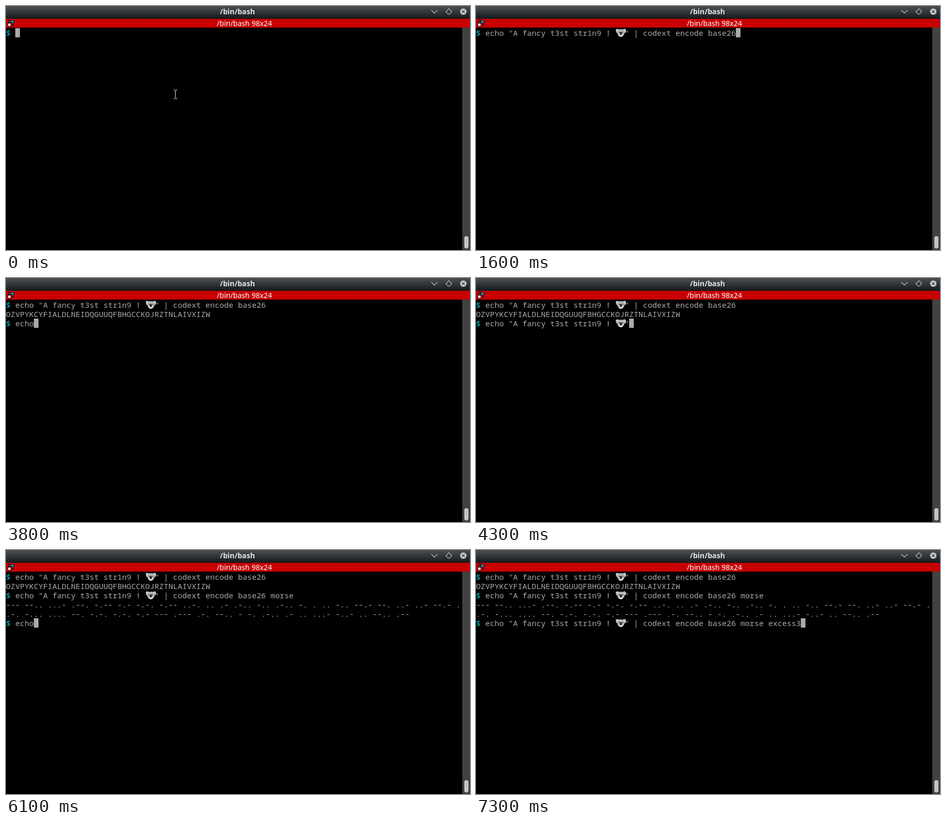
Write an HTML page that moves like this. It is 900 px wide and 475 px high and loops after 8 s.

```html
<!DOCTYPE html>
<html lang="en">
<head>
<meta charset="utf-8">
<title>Terminal session</title>
<style>
  html, body { margin: 0; width: 100%; height: 100%; overflow: hidden; background: #000; }
  svg { display: block; width: 900px; height: 475px; }
  text { white-space: pre; }
  .bar { font: 14.1px "Noto Sans", sans-serif; text-anchor: middle; }
  .title { font-weight: bold; fill: #e2e3e3; }
  #rows text { font: 15px "Noto Sans Mono", monospace; font-variant-ligatures: none; fill: #aaa; }
  #rows .prompt { font-weight: bold; fill: #06989a; }
</style>
</head>
<body>
<svg viewBox="0 0 900 475">
  <defs>
    <linearGradient id="chrome" x1="0" y1="0" x2="0" y2="1">
      <stop offset="0" stop-color="#4a5054"/>
      <stop offset=".5" stop-color="#303538"/>
      <stop offset="1" stop-color="#16181a"/>
    </linearGradient>
    <g id="koala">
      <path d="M1 3Q4 0 8 3L7 8Q4 11 2 8Z M21 3Q18 0 14 3L15 8Q18 11 20 8Z" fill="#d5d0d0"/>
      <path d="M3 4Q5 3 7 5L6 8Q4 8 3 4Z M19 4Q17 3 15 5L16 8Q18 8 19 4Z" fill="#b5a5a8"/>
      <path d="M6 4Q11 0 16 4Q19 9 17 13Q14 17 11 17Q8 17 5 13Q3 9 6 4Z" fill="#b9b9b9"/>
      <ellipse cx="11" cy="14.4" rx="3.6" ry="2" fill="#dedede"/>
      <ellipse cx="11" cy="10.2" rx="2" ry="3.2" fill="#252525"/>
      <circle cx="7.4" cy="8.3" r="1" fill="#252525"/>
      <circle cx="14.6" cy="8.3" r="1" fill="#252525"/>
    </g>
  </defs>

  <rect width="900" height="475"/>
  <rect width="900" height="25" fill="url(#chrome)"/>
  <text class="bar title" x="449" y="16">/bin/bash</text>
  <g fill="none" stroke="#c6c8c9" stroke-width="1.1">
    <path d="M825 8l6 6 6-6"/>
    <path d="M859 5.2l5.8 5.8-5.8 5.8-5.8-5.8z"/>
  </g>
  <circle cx="887" cy="11" r="6.2" fill="#c6c8c9"/>
  <path d="M884.3 8.3l5.4 5.4m0-5.4l-5.4 5.4" stroke="#25292b" stroke-width="1.2"/>

  <rect y="25" width="900" height="17" fill="#c80003"/>
  <text class="bar" x="462.5" y="39" fill="#fff">/bin/bash 98x24</text>
  <g stroke="#140606">
    <rect x="4.5" y="27.5" width="5" height="5" fill="#9c1015"/>
    <rect x="9.5" y="27.5" width="6" height="6" fill="#28809c"/>
    <rect x="3.5" y="33.5" width="6" height="6" fill="#e4e4e4"/>
  </g>
  <path d="M11 36h5l-2.5 3z" fill="#140606"/>

  <rect x="885" y="42" width="15" height="433" fill="#424041"/>
  <rect x="889" y="448" width="8" height="24" rx="4" fill="#c4c4c4"/>

  <g id="rows"></g>
  <rect id="cursor" width="9" height="18" fill="#aaa"/>
  <path id="pointer" d="M325 163.5h2.5l1 1 1-1h2.5M328.5 164v16M325 180.5h2.5l1-1 1 1h2.5" fill="none" stroke="#eee"/>
</svg>
<script>
const LOOP = 8000, CELL = 9, LINE = 18, TOP = 43;
// Two blank cells hold the emoji at columns 30 and 31.
const base = '  echo "A fancy t3st str1n9 !   " | codext encode base26';
const lines = [
  { text: base, command: true },
  { text: 'OZVPYKCYFIALDLNEIDQGUUQFBHGCCKOJRZTNLAIVXIZW' },
  { text: base + ' morse', command: true },
  { text: '--- --.. ...- .--. -.-- -.- -.-. -.-- ..-. .. .- .-.. -.. .-.. -. . .. -.. --.- --. ..- ..- --.- .' },
  { text: '.-. -... .... --. -.-. -.-. -.- --- .--- .-. --.. - -. .-.. .- .. ...- -..- .. --.. .--' },
  { text: base + ' morse excess3', command: true }
];

// Each step: time in ms, row reached, column reached, cursor hidden.
const steps = [
  [0, 0, 2], [600, 0, 6], [700, 0, 11], [800, 0, 16],
  [1000, 0, 26], [1100, 0, 34], [1200, 0, 43], [1600, 0, 56], [3000, 0, 56, true],
  [3400, 1, 98, true], [3500, 2, 2],
  [3800, 2, 6], [3900, 2, 12], [4000, 2, 19], [4100, 2, 26],
  [4300, 2, 33], [4400, 2, 40], [4500, 2, 47], [4700, 2, 55], [4800, 2, 62],
  [5600, 4, 98, true], [5700, 5, 2],
  [6100, 5, 6], [6200, 5, 11], [6300, 5, 17], [6400, 5, 22], [6500, 5, 28],
  [6700, 5, 36], [6800, 5, 45],
  [7000, 5, 52], [7100, 5, 58], [7200, 5, 64], [7300, 5, 70]
];

const find = id => document.getElementById(id);
const cursor = find('cursor'), pointer = find('pointer');

function add(parent, tag, attrs, text = '') {
  const node = document.createElementNS('http://www.w3.org/2000/svg', tag);
  for (const key in attrs) node.setAttribute(key, attrs[key]);
  node.textContent = text;
  return parent.appendChild(node);
}

function show(node, on) {
  node.style.display = on ? '' : 'none';
}

const rows = lines.map(({ text, command }, i) => {
  const y = TOP + i * LINE;
  const group = add(find('rows'), 'g', {});
  const row = { group, text, body: add(group, 'text', { x: 0, y: y + 15 }) };
  if (command) {
    add(group, 'text', { x: 0, y: y + 15, class: 'prompt' }, '$');
    row.emoji = add(group, 'use', { href: '#koala', x: 270, y });
  }
  return row;
});

let shown;
function draw(now) {
  const time = now % LOOP;
  const step = steps.findLast(s => s[0] <= time);
  if (step !== shown) {
    shown = step;
    const [start, current, col, hidden] = step;
    rows.forEach(({ group, text, body, emoji }, i) => {
      const end = i < current ? text.length : col;
      show(group, i <= current);
      body.textContent = text.slice(0, end);
      if (emoji) show(emoji, end >= 32);
    });
    cursor.setAttribute('x', col * CELL);
    cursor.setAttribute('y', TOP + current * LINE);
    show(cursor, !hidden);
    show(pointer, start < 600);
  }
}

function tick() {
  draw(performance.now());
  requestAnimationFrame(tick);
}
tick();
</script>
</body>
</html>
```
